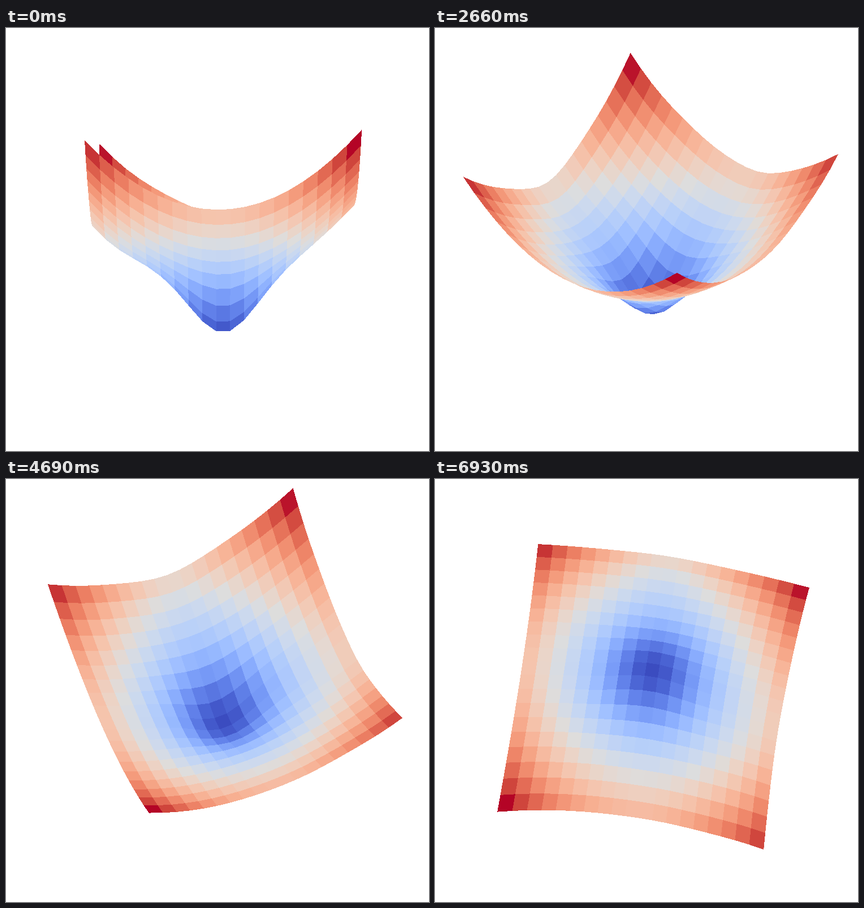
These frames come from a looping animation (748x748 px, 7000 ms). An HTML page with a canvas:

```html
<!DOCTYPE html>
<html lang="en">
<head>
<meta charset="utf-8">
<title>Rotating surface</title>
<style>
  html, body { margin: 0; overflow: hidden; background: #fff; }
  canvas { display: block; }
</style>
</head>
<body>
<canvas id="stage" width="748" height="748"></canvas>
<script>
const SIZE = 748, CELLS = 19, HALF = 0.5715;
const EYE = 10, ZOOM = SIZE / 0.185, CX = 0.095 * ZOOM, CY = 0.09 * ZOOM;
const STEP_MS = 70, STEPS = 100;

const ctx = document.getElementById('stage').getContext('2d');
const image = ctx.createImageData(SIZE, SIZE);
const pixels = new Uint32Array(image.data.buffer);

// Diverging blue - grey - red colour ramp
const RAMP = [
  [59, 76, 192], [77, 104, 215], [98, 130, 234], [119, 154, 247], [141, 176, 254],
  [163, 194, 255], [184, 208, 249], [204, 217, 238], [221, 221, 221], [236, 211, 197],
  [245, 196, 173], [247, 177, 148], [244, 154, 123], [236, 127, 99], [222, 96, 77],
  [203, 62, 56], [180, 4, 38]
];

function rampColor(v) {
  const pos = v * (RAMP.length - 1);
  const i = Math.min(Math.floor(pos), RAMP.length - 2);
  const [r, g, b] = RAMP[i].map((c, k) => Math.round(c + (RAMP[i + 1][k] - c) * (pos - i)));
  return (255 << 24 | b << 16 | g << 8 | r) >>> 0;
}

// Gaussian lumps: the central well, then gentle dents and swells near the rim
const LUMPS = [
  { x: 0, y: 0, size: -0.2227, spread: 0.0375 },
  { x: 0.025, y: -0.54, size: -0.058, spread: 0.04 },
  { x: 0, y: 0.54, size: 0.037, spread: 0.12 },
  { x: -0.55, y: -0.25, size: 0.026, spread: 0.05 },
  { x: -0.57, y: 0.18, size: -0.018, spread: 0.02 },
  { x: -0.33, y: 0.55, size: 0.024, spread: 0.03 }
];

// Tilted paraboloid shaped by the lumps
function height(x, y) {
  const bowl = 0.9376 * (x * x + y * y) - 0.218 + 0.02 * x - 0.007 * y + 0.077 * x * y;
  return LUMPS.reduce((z, lump) =>
    z + lump.size * Math.exp(-((x - lump.x) ** 2 + (y - lump.y) ** 2) / lump.spread), bowl);
}

const points = [], faces = [];
const coord = i => HALF * (2 * i / CELLS - 1);
for (let i = 0; i <= CELLS; i++) {
  for (let j = 0; j <= CELLS; j++) {
    const x = coord(i), y = coord(j);
    points.push([x, y, height(x, y)]);
    if (i < CELLS && j < CELLS) {
      const k = i * (CELLS + 1) + j;
      faces.push({ corners: [k, k + 1, k + CELLS + 2, k + CELLS + 1] });
    }
  }
}

const mean = (list, pick) => list.reduce((sum, item) => sum + pick(item), 0) / list.length;
for (const face of faces) face.level = mean(face.corners, k => points[k][2]);
const levels = faces.map(face => face.level);
const low = Math.min(...levels), high = Math.max(...levels);
for (const face of faces) face.color = rampColor((face.level - low) / (high - low));

// Fills a quad without antialiasing, sampling at pixel centres
function fillQuad(quad, color) {
  const ys = quad.map(p => p.y);
  const top = Math.max(0, Math.ceil(Math.min(...ys) - 0.5));
  const bottom = Math.min(SIZE, Math.ceil(Math.max(...ys) - 0.5));
  for (let row = top; row < bottom; row++) {
    const y = row + 0.5;
    let left = Infinity, right = -Infinity;
    quad.forEach((p, i) => {
      const q = quad[(i + 1) % 4];
      if (p.y <= y === q.y <= y) return;
      const x = p.x + (q.x - p.x) * (y - p.y) / (q.y - p.y);
      left = Math.min(left, x);
      right = Math.max(right, x);
    });
    if (left > right) continue;
    const from = Math.max(0, Math.ceil(left - 0.5));
    const to = Math.min(SIZE, Math.ceil(right - 0.5));
    if (from < to) pixels.fill(color, row * SIZE + from, row * SIZE + to);
  }
}

// The same angle drives both elevation and azimuth
function draw(degrees) {
  const s = Math.sin(degrees * Math.PI / 180), c = Math.cos(degrees * Math.PI / 180);
  const projected = points.map(([x, y, z]) => {
    const across = c * y - s * x, toward = c * x + s * y;
    const depth = EYE - c * toward - s * z;
    return {
      x: CX + ZOOM * across / depth,
      y: CY - ZOOM * (c * z - s * toward) / depth,
      depth
    };
  });
  for (const face of faces) face.depth = mean(face.corners, k => projected[k].depth);
  faces.sort((a, b) => b.depth - a.depth);

  pixels.fill(0xffffffff);
  for (const face of faces) fillQuad(face.corners.map(k => projected[k]), face.color);
  ctx.putImageData(image, 0, 0);
}

let shown = -1;
function tick() {
  const step = Math.floor(performance.now() / STEP_MS) % STEPS;
  if (step !== shown) draw(shown = step);
  requestAnimationFrame(tick);
}
tick();
</script>
</body>
</html>
```
